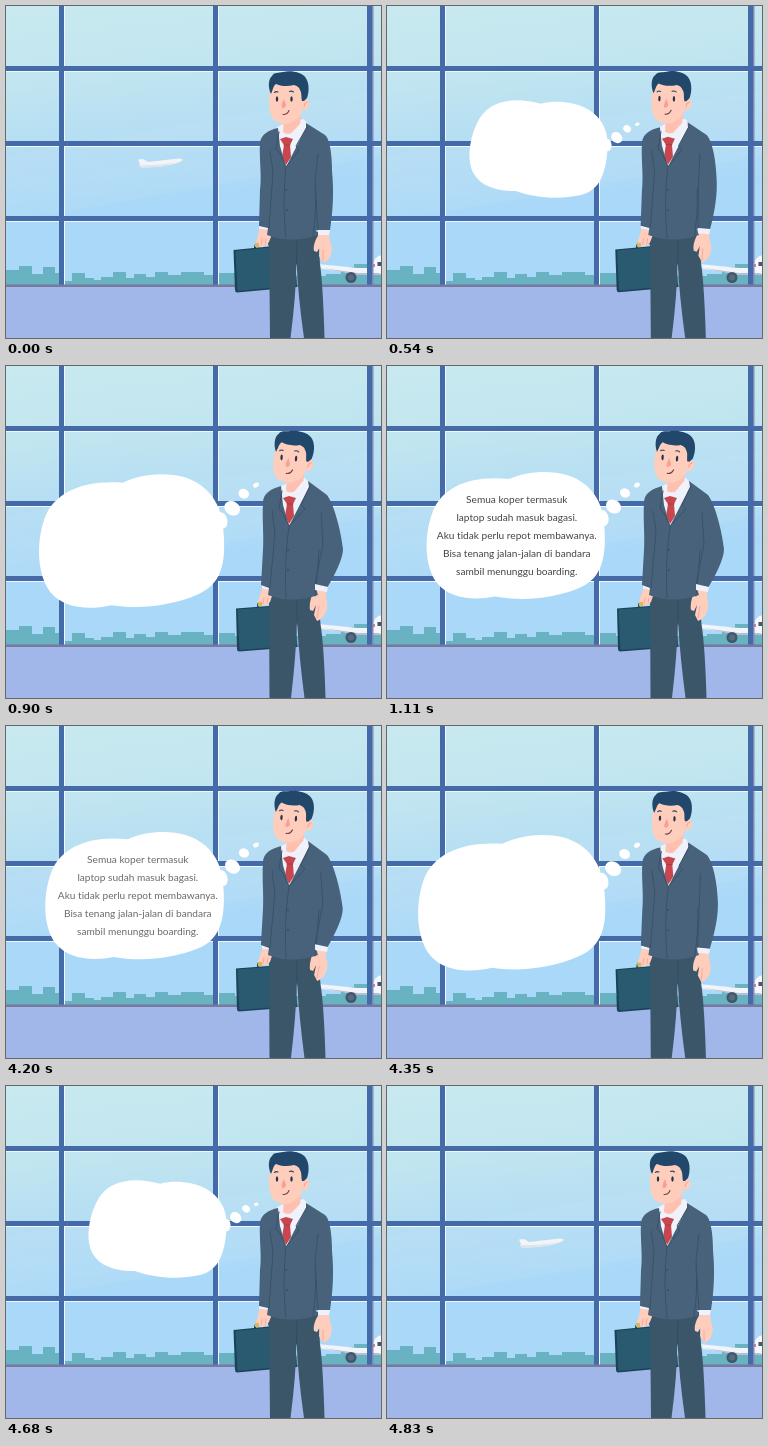
An HTML page with a canvas that plays this animation: 375 px wide and 332 px high, repeating every 5.4 s.

```html
<!DOCTYPE html>
<html lang="id">
<head>
<meta charset="utf-8">
<style>
html, body { margin: 0; width: 100%; height: 100%; overflow: hidden; }
canvas { display: block; width: 375px; height: 332px; }
</style>
</head>
<body>
<canvas id="stage"></canvas>
<script>
const W = 375, H = 332, LOOP = 5400, STEP = 30, PEAK = 1.08;
const canvas = document.getElementById('stage');
const ctx = canvas.getContext('2d');
const dpr = window.devicePixelRatio || 1;
canvas.width = W * dpr;
canvas.height = H * dpr;

const JACKET = '#47627a', SEAM = '#3a5268', PANTS = '#3c5669', SKIN = '#ffcdbc',
  PINK = '#f79f98', HAIR = '#21486b', SHIRT = '#eff1fb', BAR = '#456aa8',
  GLINT = '#eef7fd', CITY = '#68b2c2';
const LINES = [
  'Semua koper termasuk',
  'laptop sudah masuk bagasi.',
  'Aku tidak perlu repot membawanya.',
  'Bisa tenang jalan-jalan di bandara',
  'sambil menunggu boarding.'
];

const clamp = u => Math.max(0, Math.min(1, u));
const smooth = u => (u = clamp(u), u * u * (3 - 2 * u));

function rect(x, y, w, h, color) {
  ctx.fillStyle = color;
  ctx.fillRect(x, y, w, h);
}

function fill(d, color) {
  ctx.fillStyle = color;
  ctx.fill(new Path2D(d));
}

function stroke(d, color, width = 1) {
  ctx.strokeStyle = color;
  ctx.lineWidth = width;
  ctx.lineCap = ctx.lineJoin = 'round';
  ctx.stroke(new Path2D(d));
}

function oval(x, y, rx, ry, color, turn = 0) {
  ctx.fillStyle = color;
  ctx.beginPath();
  ctx.ellipse(x, y, rx, ry, turn, 0, 7);
  ctx.fill();
}

// Blend two paths that share the same commands.
function blend(a, b, k) {
  const to = b.match(/-?[\d.]+/g);
  let i = 0;
  return a.replace(/-?[\d.]+/g, n => +n + (to[i++] - n) * k);
}

function drawSky() {
  const sky = ctx.createLinearGradient(0, 0, 25, 250);
  sky.addColorStop(0, '#c8e9ef');
  sky.addColorStop(0.3, '#c2e6f0');
  sky.addColorStop(0.6, '#b3ddf4');
  sky.addColorStop(0.85, '#a9d8f8');
  sky.addColorStop(1, '#a9d8f8');
  rect(0, 0, W, H, sky);
  fill('M0 150L375 84V150L0 216Z', 'rgba(200,228,240,.18)');
}

function drawCity() {
  const roofs = [0, 264, 13, 260, 26, 268, 37, 261, 49, 267, 58, 275, 66, 267, 79, 272,
    88, 274, 95, 271, 107, 266, 120, 272, 128, 268, 140, 271, 149, 266, 162, 269, 175, 266,
    198, 269, 212, 267, 229, 270, 320, 268, 335, 261, 348, 258, 361, 264, 375];
  for (let i = 0; i + 2 < roofs.length; i += 2)
    rect(roofs[i], roofs[i + 1], roofs[i + 2] - roofs[i], 280 - roofs[i + 1], CITY);
}

function drawPlanes() {
  fill('M132 153.5L137 153L142 156L168 153Q177 151.500 176.500 154.500Q172 158 151 161L137 161.500Q132 161 134 158Z', '#f4f4f6');
  fill('M133 159Q150 160 172 156Q160 160 150 161L137 161.500Q132 161 133 159Z', '#dfe3ec');
  fill('M312 258L352 262H375V268L352 268L316 263Z', '#f3f4fa');
  fill('M316 262L352 267L375 267V269L350 269Z', '#b8bfd2');
  fill('M376 249Q368 251 367 258Q367 267 376 268Z', '#f6f7fc');
  rect(371.500, 256, 4, 4, '#3f5873');
  rect(367, 258, 2, 3, '#d9808c');
  oval(345, 271.500, 5.5, 5.5, '#42566c');
  oval(345, 271.500, 3, 3, '#566c82');
}

function drawWindow() {
  const rows = [60, 135, 210];
  for (const y of rows) rect(0, y + 5, W, 1, GLINT);
  for (const x of [53, 207]) {
    rect(x, 0, 5, 280, BAR);
    rect(x + 5, 0, 1, 280, GLINT);
  }
  rect(361, 0, 5, 280, BAR);
  rect(366, 0, 1.5, 280, '#8089b4');
  for (const y of rows) rect(0, y, W, 5, BAR);
  rect(0, 278.500, W, 2.5, '#77799f');
  rect(0, 281, W, 51, '#a1b6e9');
}

function drawHead(k) {
  ctx.save();
  ctx.translate(285 + 2.5 * k, 117 - 0.5 * k);
  ctx.rotate(0.085 * k);
  ctx.translate(-285, -117);
  fill('M265 78C262 92 262 108 268 114C276 121 292 118 296 105L298 78Z', SKIN);
  oval(299, 98.500, 4.2, 5.8, SKIN, 0.3);
  stroke('M298 100.500Q298 96.500 301 96', PINK, 1);
  fill('M265 88C262 82 262 73 266 70C268 66 273 67 277 66C284 64 293 66 297 69C303 73 304 84 301 92L298 95L296 95C295 91 296 87 294 84C293 81 291 80 288 79C281 81 274 80 270 78C267 80 267 84 265 88Z', HAIR);
  oval(271, 93, 1.2, 2.8, '#28334a');
  oval(285.500, 93, 1.2, 2.8, '#28334a');
  stroke('M268.500 86.500Q270 85 272 86M283.500 85.500Q285.500 84.500 287.500 86', HAIR, 1.1);
  fill('M278 93Q274 101 276.500 102Q279 103 280 99Z', PINK);
  stroke('M277 108.500Q281 109 283 104.500', '#71414c', 1.1);
  ctx.restore();
}

function drawMan(k) {
  const part = (a, b, color) => fill(blend(a, b, k), color);
  const line = (a, b, color = SEAM, w = 1) => stroke(blend(a, b, k), color, w);

  // Briefcase
  part('M227.500 244L288 238L291 281L231 286.500Q229 286 229 284Z',
    'M230 242.500L289 238L291 281L233 285.500Q231 285 231 283Z', '#1b4258');
  part('M229.500 245L288 239L290 279.500L231.500 285Z',
    'M231.500 243.500L288 239L290 279.500L233.500 284Z', '#2a5a70');
  line('M249 242Q249 237 254 237L261 236Q264 237 264 241', 'M252 240Q252 236 256 236L262 235Q265 236 265 240', '#1b4258', 2);

  // Legs
  part('M263 226L264 332H284.500Q290 290 290.500 255Q292 290 298 332H318.500Q317 280 314 258L312 226Z',
    'M263 226L263.500 332H285Q290 290 291 255Q293 290 298.500 332H319.500Q318 280 314.500 258L312 226Z', PANTS);
  line('M291 235L290.500 258', 'M291 235L291 258', '#334a5d');

  // Hand on the handle
  part('M254 221L251 233Q249 238 252 240Q258 243 262 238L265 231L263 221Z',
    'M257 221L253 232Q251 237 254 239Q260 241 264 236L266 230L265 221Z', SKIN);
  line('M256 233L255 239M260 233L259 239', 'M258 232L257 238M262 232L261 237', PINK, 0.8);
  part('M249 237h4v4h-4Z', 'M252 236h4v4h-4Z', '#e1b654');
  part('M253 219L264 221V224L253 222.500Z', 'M256 219L266 221V224L256 222.500Z', SHIRT);

  // Free hand
  part('M313 228C309 234 307 240 308 245L311 246L314 241L313 250L317 257L321 255C326 250 327 242 324 236L323 228Z',
    'M309 222C305 230 303 238 304 244L307 245L310 239L308 249L311 255L315 253C321 248 323 239 320 232L320 222Z', SKIN);
  line('M317 244L317 255', 'M313 240L311 252', PINK, 0.8);

  // Shirt, neck and tie
  part('M270 122L279 117L298 113L304 122L282 166L270 142Z', 'M273 121L282 117L299 112L307 121L285 166L273 142Z', SHIRT);
  part('M278 111L277 126Q285 132 294 119L295 108Z', 'M281 111L280 125Q288 130 297 118L298 108Z', '#ffc0b0');
  part('M274 122L281 132L275 137L272 126Z', 'M277 122L284 131L278 137L275 126Z', SHIRT);
  part('M281 132L294 118L300 118L288 138Z', 'M284 131L297 115L303 117L291 137Z', SHIRT);
  part('M274 133L280 131L287 133L284 139L285 151L280 159L276 151L278 139Z',
    'M277 132L283 130L290 132L287 138L288 150L283 158L279 150L281 138Z', '#c8474f');
  line('M278 139H284', 'M281 138H287', '#a4353f', 0.8);

  // Jacket
  part('M272 122C263 124 255 128 254 137C253 152 256 170 254 184L253 220L262 222L261 229Q286 238 312 229L310 224L324 224C327 205 328 186 326 165C326 145 323 132 319 129L300 117L300 122L280 161L274 140Z',
    'M275 120C265 123 257 127 257 137C256 152 258 170 257 184L255 219L263 222L262 229Q286 238 312 229L309 219L321 222C329 208 337 193 337 183C335 165 328 138 321 129L302 115L303 121L283 160L277 139Z', JACKET);
  line('M312 148L309 175L312 224', 'M315 147L317 178L309 218');
  line('M309 181Q311 205 307 230', 'M313 184Q312 205 309 230');
  line('M264 145L267 166L263 222', 'M266 145L269 166L264 222');
  line('M273 126L270 143L274 147L280 161L293 144L290 140L301 121',
    'M276 125L273 143L277 147L283 160L299 143L295 139L304 120');
  line('M280 161Q276 195 280 232', 'M283 160Q278 195 280 232');
  part('M279 183h2v2h-2Z', 'M281 183h2v2h-2Z', SEAM);
  part('M280 203h2v2h-2Z', 'M281 203h2v2h-2Z', SEAM);
  part('M312 224L324 224L323 229L312 229Z', 'M309 218L322 221L321 226L309 224Z', SHIRT);

  drawHead(k);
}

function drawBubble(s) {
  if (s <= 0) return;
  ctx.save();
  ctx.translate(252, 117);
  ctx.rotate((1 - s) * 0.7);
  ctx.scale(s, s);
  ctx.translate(-252, -117);
  fill('M122 113C140 105 163 104 180 109C205 117 217 137 217.500 163C219.500 195 213 214 191 222.500C166 232.500 135 235.500 108 230.500C85 235 62 232 50 217C37 200 37 168 46 145C56 120 85 109 122 113Z', '#fff');
  oval(216.500, 152, 5, 8, '#fff', -0.2);
  oval(226.500, 140.500, 8, 6.6, '#fff', 0.6);
  oval(238, 127, 5.2, 4.6, '#fff', 0.5);
  oval(250, 119, 3, 2.2, '#fff', -0.5);
  ctx.restore();
}

function drawText(a) {
  if (a <= 0) return;
  ctx.globalAlpha = a;
  ctx.fillStyle = '#434345';
  ctx.font = '10.1px Lato, sans-serif';
  ctx.letterSpacing = '0.01px'; // keeps letters unjoined
  ctx.textAlign = 'center';
  LINES.forEach((s, i) => ctx.fillText(s, 129.8 + 10 * (1 - a), 137 + 18 * i));
  ctx.globalAlpha = 1;
}

// Pop past full size, then settle; leaving runs the same curve backwards.
function bubbleScale(t) {
  const r = t < LOOP / 2 ? t : 5220 - t;
  if (r < 750) return PEAK * (1 - Math.pow(1 - clamp((r - 390) / 360), 2.3));
  return PEAK + (1 - PEAK) * smooth((r - 750) / 300);
}

function draw(t) {
  const entering = t < LOOP / 2;
  const pose = entering ? smooth((t - 405) / 360) : 1 - smooth((t - 4170) / 330);
  const ink = entering ? clamp((t - 960) / 150) : 1 - clamp((t - 4170) / 150);
  ctx.setTransform(dpr, 0, 0, dpr, 0, 0);
  drawSky();
  drawCity();
  drawPlanes();
  drawWindow();
  drawMan(pose);
  drawBubble(bubbleScale(t));
  drawText(ink);
}

const start = performance.now();
function tick() {
  const t = (performance.now() - start) % LOOP;
  draw(Math.floor(t / STEP) * STEP);
  requestAnimationFrame(tick);
}
tick();
</script>
</body>
</html>
```
